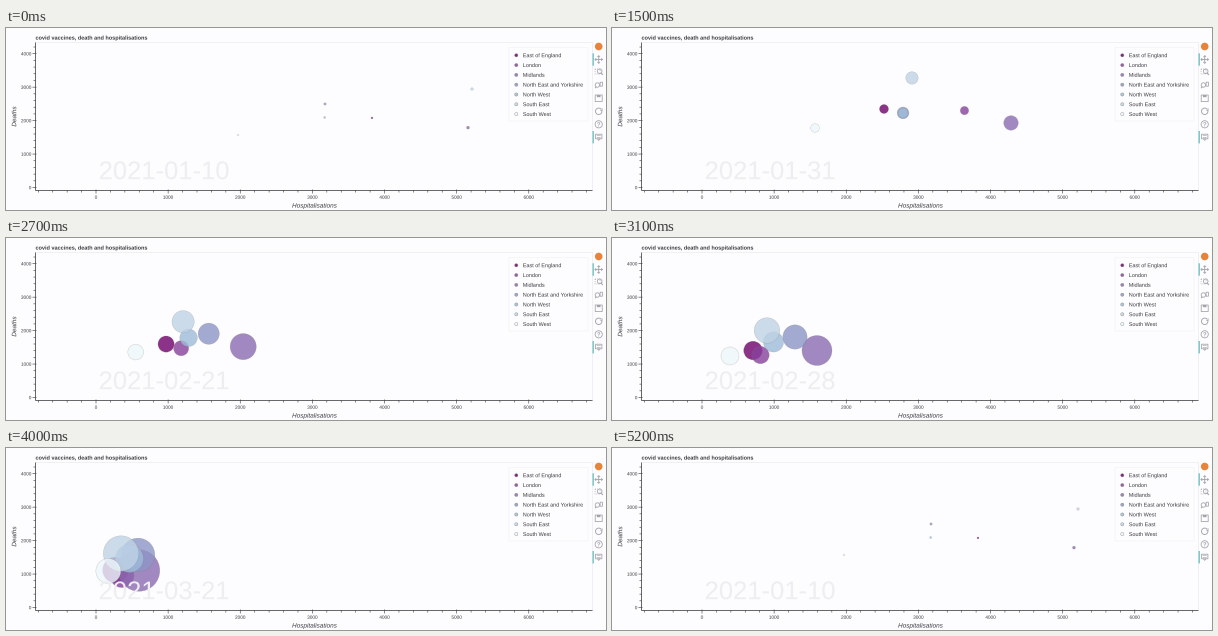
Recreate the animation shown at these times as a matplotlib script. Size 600x182 px, loop 5.5 s.

```python
import numpy as np
import matplotlib.pyplot as plt
from matplotlib.animation import FuncAnimation
from matplotlib.patches import Circle, PathPatch, Rectangle
from matplotlib.path import Path
from matplotlib.textpath import TextPath

W, H, DPI = 600, 182, 100
PX = 72 / DPI
BG, INK, GREY = "#fdfcfe", "#3c3c3e", "#a3a3a9"
STEP_MS, FRAME_MS, LOOP_MS, RESET_MS = 400, 100, 5500, 5000
LAST_WEEK = 10
KEY_WEEKS = [0, 3, 7, LAST_WEEK]

# name, colour, population factor, hospitalisations and deaths in the key weeks
REGIONS = [
    ("East of England", "#6e016b", 0.62, [3826, 2523, 707, 270], [2080, 2347, 1405, 1120]),
    ("London", "#88419d", 0.58, [6000, 3639, 811, 360], [2150, 2300, 1270, 957]),
    ("Midlands", "#8c6bb1", 1.0, [5157, 4284, 1594, 596], [1790, 1930, 1405, 1106]),
    ("North East and Yorkshire", "#8c96c6", 0.81, [3175, 2787, 1289, 582],
     [2497, 2230, 1809, 1570]),
    ("North West", "#9ebcda", 0.67, [3170, 2787, 991, 464], [2093, 2225, 1660, 1465]),
    ("South East", "#bfd3e6", 0.85, [5213, 2911, 901, 347], [2945, 3275, 2003, 1614]),
    ("South West", "#edf8fb", 0.60, [1969, 1567, 388, 171], [1570, 1779, 1241, 1091]),
]


def sx(v):
    return 90 + 0.07213 * v


def sy(v):
    return 159.5 - 0.03345 * v


def decay(week, values):
    """Exponential change between the key weeks."""
    return np.exp(np.interp(week, KEY_WEEKS, np.log(values)))


def radius(week, factor):
    return factor * (1.5 + 1.93 * week)


def week_date(week):
    return str(np.datetime64("2021-01-10") + 7 * week)


fig = plt.figure(figsize=(W / DPI, H / DPI), dpi=DPI, facecolor=BG)
ax = fig.add_axes([0, 0, 1, 1])
ax.set_xlim(0, W)
ax.set_ylim(H, 0)
ax.axis("off")


def line(xs, ys, color=INK, lw=0.75, z=1):
    ax.plot(xs, ys, color=color, lw=lw * PX, zorder=z, solid_capstyle="butt", snap=False)


def text_path(x, y, s, size, ha="left", rotated=False, **font):
    """Unhinted text outline with its baseline at y."""
    raw = TextPath((0, 0), s, size=size, prop=dict(family="Liberation Sans", **font))
    pts = raw.vertices * [1, -1]
    box_x = raw.get_extents()
    pts[:, 0] -= {"left": 0, "center": (box_x.x0 + box_x.x1) / 2, "right": box_x.x1}[ha]
    if rotated:
        pts = pts[:, ::-1] * [1, -1]
    return Path(pts + [x, y], raw.codes)


def label(x, y, s, size, color=INK, z=1, **kw):
    path = text_path(x, y, s, size, **kw)
    return ax.add_patch(PathPatch(path, fc=color, lw=0, zorder=z, snap=False))


def disc(x, y, r, color, z=6):
    ax.add_patch(Circle((x, y), r, fc=color, lw=0, zorder=z))


def ring(x, y, r):
    ax.add_patch(Circle((x, y), r, fill=False, ec=GREY, lw=0.8 * PX, zorder=6))


def box(x, y, w, h, fc="none", ec="none", lw=0.8, z=6, **kw):
    ax.add_patch(Rectangle((x, y), w, h, fc=fc, ec=ec, lw=lw * PX, zorder=z,
                           snap=False, **kw))


def draw_axes():
    left, right, top, bottom = 29.5, 586.5, 14.5, 162.5
    box(left, top, right - left, bottom - top, ec="#e8e7ea", lw=0.6, z=0)
    line([left, left], [top, bottom])
    line([left, right], [bottom, bottom])
    for v in range(-800, 6801, 200):
        reach = 1 if v % 1000 == 0 else 0
        line([sx(v)] * 2, [bottom - reach, bottom + 2 + reach], lw=0.6)
        if reach:
            label(sx(v), 170.8, str(v), 4.7, ha="center")
    for v in range(0, 4301, 200):
        reach = 1 if v % 1000 == 0 else 0
        line([left - 2 - reach, left + reach], [sy(v)] * 2, lw=0.6)
        if reach:
            label(25.2, sy(v) + 1.7, str(v), 4.7, ha="right")
    label(29.5, 11.6, "covid vaccines, death and hospitalisations", 5.52, weight="bold")
    label(308.5, 179.6, "Hospitalisations", 6.4, ha="center", style="italic")
    label(10.2, 88.5, "Deaths", 6.4, ha="center", rotated=True, style="italic")


def draw_legend():
    box(503, 19.5, 79, 73.5, fc=BG, ec="#efeef1", lw=0.5, z=4, alpha=0.95)
    for i, (name, color, *_) in enumerate(REGIONS):
        y = 27.3 + 9.8 * i
        ax.add_patch(Circle((510.3, y), 1.6, fc=color, ec=("#7c7e71", 0.5),
                            lw=0.4 * PX, alpha=0.85, zorder=5))
        label(516.8, y + 1.9, name, 5.46, z=5)


def draw_toolbar():
    x = 592.7
    disc(x, 18.5, 3.8, "#e8833a")
    for y in (25.3, 103):
        box(586.6, y, 1.1, 12.4, fc="#4fb3b8")
    # pan
    line([x - 3.8, x + 3.8], [31.5, 31.5], GREY, 0.9, 6)
    line([x, x], [27.7, 35.3], GREY, 0.9, 6)
    for dx, dy in ((1, 0), (-1, 0), (0, 1), (0, -1)):
        tip = np.array([x + 3.8 * dx, 31.5 + 3.8 * dy])
        back, side = np.array([dx, dy]) * 1.3, np.array([dy, dx]) * 1.3
        line(*np.array([tip - back + side, tip, tip - back - side]).T, GREY, 0.8, 6)
    # box zoom
    box(x - 3.6, 41, 5, 5, ec=GREY, linestyle=":")
    ring(x + 1, 43.3, 2.3)
    line([x + 2.6, x + 4], [45, 47], GREY, 1.1, 6)
    # wheel zoom
    ring(x - 1.3, 57, 2.2)
    line([x - 3.6, x - 2.6], [60.2, 58.8], GREY, 1, 6)
    box(x + 1.4, 54.2, 2.3, 4, ec=GREY)
    # save
    box(x - 3.5, 67, 7, 6.6, ec=GREY)
    box(x - 1.8, 67, 3.6, 2.2, fc=GREY)
    # reset
    a = np.radians(np.linspace(-20, 320, 50))
    line(x + 3.2 * np.cos(a), 83.3 + 3.2 * np.sin(a), GREY, 0.9, 6)
    line([x + 1.6, x + 3.3, x + 3.4], [82.2, 82.4, 80.4], GREY, 0.8, 6)
    # help
    ring(x, 96.3, 3.6)
    label(x, 98.4, "?", 6, GREY, z=6, ha="center", weight="bold")
    # hover
    box(x - 3.2, 106.2, 6.4, 4.6, ec=GREY)
    line([x - 1.2, x, x + 1.2], [110.8, 112.4, 110.8], GREY, 0.8, 6)
    for y in (107.7, 109.3):
        line([x - 2, x + 2], [y, y], GREY, 0.6, 6)


draw_axes()
draw_legend()
draw_toolbar()

dates = [text_path(92.6, 151.2, week_date(w), 25.6) for w in range(LAST_WEEK + 1)]
date = ax.add_patch(PathPatch(dates[0], fc="#eeedef", lw=0, zorder=3, snap=False))
bubbles = [ax.add_patch(Circle((0, 0), 1, fc=(color, 0.8), ec=("#7c7e71", 0.4),
                               lw=0.4 * PX, zorder=2))
           for _, color, *_ in REGIONS]


def update(frame):
    t = frame * FRAME_MS
    week = 0 if t >= RESET_MS else min(t // STEP_MS, LAST_WEEK)
    date.set_path(dates[week])
    for dot, (_, _, factor, hosp, deaths) in zip(bubbles, REGIONS):
        dot.set_center((sx(decay(week, hosp)), sy(decay(week, deaths))))
        dot.set_radius(radius(week, factor))
    return [*bubbles, date]


anim = FuncAnimation(fig, update, frames=LOOP_MS // FRAME_MS, interval=FRAME_MS,
                     repeat=True, repeat_delay=0, blit=False)
plt.show()
```
